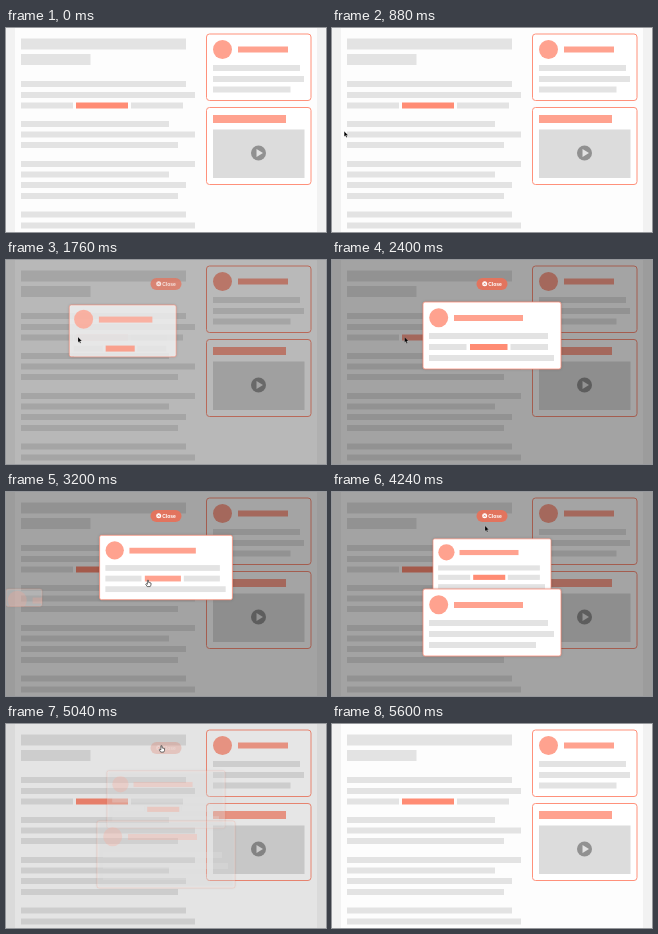
Write an HTML page with a canvas that moves like this. It is 320x204 px and loops after 5.76 s.

```html
<!DOCTYPE html>
<html lang="en">
<head>
<meta charset="utf-8">
<title>Stacked popups</title>
<style>
  html, body { margin: 0; width: 100%; height: 100%; overflow: hidden; background: #f2f2f2; }
  canvas { display: block; width: 320px; height: 204px; }
</style>
</head>
<body>
<canvas id="stage"></canvas>
<script>
const LOOP = 5760, STEP = 80, MOVE = 720;
const GREY = '#e3e3e3', CORAL = '#ffa28f', LINK = '#ff8c74', BORDER = '#ff917b';
const canvas = document.getElementById('stage');
const ctx = canvas.getContext('2d');
const ratio = window.devicePixelRatio || 1;
canvas.width = 320 * ratio;
canvas.height = 204 * ratio;

const lerp = (a, b, p) => a + (b - a) * p;

// Quintic ease in and out, clamped to 0..1
function ease(time, start) {
  const t = Math.min(1, Math.max(0, (time - start) / MOVE));
  return t < .5 ? 16 * t ** 5 : 1 - 16 * (1 - t) ** 5;
}

function bar(x, y, w, h = 6, color = GREY) {
  ctx.fillStyle = color;
  ctx.fillRect(x, y, w, h);
}

function disc(x, y, r, color = CORAL) {
  ctx.fillStyle = color;
  ctx.beginPath();
  ctx.arc(x, y, r, 0, 7);
  ctx.fill();
}

function roundBox(x, y, w, h, r) {
  ctx.beginPath();
  ctx.roundRect(x, y, w, h, r);
}

function polygon(points, color) {
  ctx.beginPath();
  points.forEach(([x, y]) => ctx.lineTo(x, y));
  ctx.closePath();
  ctx.fillStyle = color;
  ctx.fill();
}

function card(y, h) {
  roundBox(200.5, y, 104.5, h, 3);
  ctx.fillStyle = '#fff';
  ctx.fill();
  ctx.strokeStyle = BORDER;
  ctx.lineWidth = 1;
  ctx.stroke();
}

function page(linkColor) {
  ctx.fillStyle = '#f2f2f2';
  ctx.fillRect(0, 0, 320, 204);
  bar(9, 0, 302, 204, '#fdfdfd');
  bar(15, 10.5, 165, 11);
  bar(15, 26, 69.5, 11);
  const rows = [[53, 165], [64, 174], [74.5, 52], [93, 148], [103.5, 174], [114, 157],
    [133, 174], [143.5, 148], [154, 165], [165, 157], [183.5, 165], [194.5, 174]];
  rows.forEach(([y, w]) => bar(15, y, w));
  bar(70, 74.5, 52, 6, linkColor);
  bar(125, 74.5, 52);

  card(6, 66.5);
  disc(216.5, 21.5, 9.5);
  bar(232, 18.5, 50, 6, CORAL);
  bar(207, 37, 87);
  bar(207, 48, 91);
  bar(207, 58.5, 77.5);

  card(79.5, 77);
  bar(207, 87, 73, 8, CORAL);
  bar(207, 101.5, 91.5, 48.5, '#dcdcdc');
  disc(252.5, 125, 7.5, '#919191');
  polygon([[250.5, 121], [257, 125], [250.5, 129]], '#e2e2e2');
}

// The box grows in from the left; widths follow it while line heights stay fixed.
function popup(top, startTop, grow, alpha, shrink, linkColor) {
  if (grow <= 0 || alpha <= 0) return;
  const w = 138 * grow, h = 67 * grow, pad = 6 * grow;
  ctx.save();
  ctx.globalAlpha = alpha;
  ctx.translate(160, top + 33.5);
  ctx.scale(shrink, shrink);
  ctx.translate(-160 + lerp(-32, 91, grow), -top - 33.5 + lerp(startTop, top, grow));
  roundBox(0, 0, w, h, 2);
  ctx.save();
  ctx.shadowColor = 'rgba(0,0,0,.25)';
  ctx.shadowBlur = 3 * ratio;
  ctx.fillStyle = '#fff';
  ctx.fill();
  ctx.restore();
  ctx.strokeStyle = BORDER;
  ctx.lineWidth = .8;
  ctx.stroke();
  ctx.clip();
  disc(pad + 9.7, pad + 9.7, 9.5);
  bar(pad + 25, pad + 7, 69 * grow, 6, CORAL);
  bar(pad, pad + 25, 119 * grow);
  if (linkColor) {
    bar(pad, pad + 36, 37.5 * grow);
    bar(47 * grow, pad + 36, 37.5 * grow, 6, linkColor);
    bar(87.5 * grow, pad + 36, 37.5 * grow);
    bar(pad, pad + 47, 125 * grow);
  } else {
    bar(pad, pad + 36, 125 * grow);
    bar(pad, pad + 47, 107 * grow);
  }
  ctx.restore();
}

function closeButton(alpha) {
  ctx.save();
  ctx.globalAlpha = alpha;
  roundBox(144.5, 18, 31, 12, 6);
  ctx.fillStyle = '#e2745e';
  ctx.fill();
  disc(152.7, 23.8, 2.5, '#fff');
  ctx.strokeStyle = '#e2745e';
  ctx.lineWidth = .7;
  ctx.beginPath();
  ctx.moveTo(151.7, 22.8);
  ctx.lineTo(153.7, 24.8);
  ctx.moveTo(153.7, 22.8);
  ctx.lineTo(151.7, 24.8);
  ctx.stroke();
  ctx.fillStyle = '#fff';
  ctx.font = 'bold 5px "Liberation Sans", Arial, sans-serif';
  ctx.fillText('Close', 156.2, 25.6);
  ctx.restore();
}

// Each stop: start of the move and where it leads
const cursorPath = [
  [640, 72, 77], [2240, 142, 88], [3815, 155.5, 21.5], [5045, -12, 10]
];

function cursorAt(time) {
  let x = 8, y = 105;
  for (const [start, toX, toY] of cursorPath) {
    const p = ease(time, start);
    x = lerp(x, toX, p);
    y = lerp(y, toY, p);
  }
  return { x, y };
}

function drawCursor({ x, y }, hand) {
  ctx.save();
  ctx.translate(x, y);
  ctx.lineJoin = 'round';
  if (hand) {
    polygon([[-.6, .3], [.5, .3], [.6, 2.4], [3, 3], [3, 5], [2.2, 6.6],
      [-.8, 6.6], [-2.3, 4.2], [-1.6, 3.6], [-.6, 4.3]], '#fff');
    ctx.strokeStyle = '#333';
    ctx.lineWidth = .7;
    ctx.stroke();
  } else {
    polygon([[0, 0], [0, 5.4], [1.2, 4.3], [2, 6.3], [2.9, 5.9], [2.1, 4], [3.8, 4]], '#000');
    ctx.strokeStyle = 'rgba(255,255,255,.6)';
    ctx.lineWidth = .3;
    ctx.stroke();
  }
  ctx.restore();
}

function draw(time) {
  ctx.setTransform(ratio, 0, 0, ratio, 0, 0);
  const cursor = cursorAt(time);
  const shown = time >= 720 && time < 5600;
  const over = (x, y, w, h) => shown && cursor.x >= x && cursor.x <= x + w
    && cursor.y >= y && cursor.y <= y + h;
  const first = ease(time, 1347);
  const second = ease(time, 2884);
  const visible = 1 - ease(time, 4640);

  page(over(70, 74, 52, 7) ? CORAL : LINK);
  ctx.fillStyle = `rgba(0,0,0,${.355 * first * visible})`;
  ctx.fillRect(0, 0, 320, 204);
  closeButton(first * visible);
  popup(42, 55, first, first * visible, 1 - .145 * second,
    over(138, 84, 38, 6) ? CORAL : LINK);
  popup(97, 97, second, second * visible, 1);

  const hand = over(138, 84, 38, 6) || (time >= 4560 && time < 5120);
  if (shown) drawCursor(cursor, hand);
}

const began = performance.now();
function tick() {
  const time = (performance.now() - began) % LOOP;
  draw(Math.floor(time / STEP) * STEP);
  requestAnimationFrame(tick);
}
tick();
</script>
</body>
</html>
```
